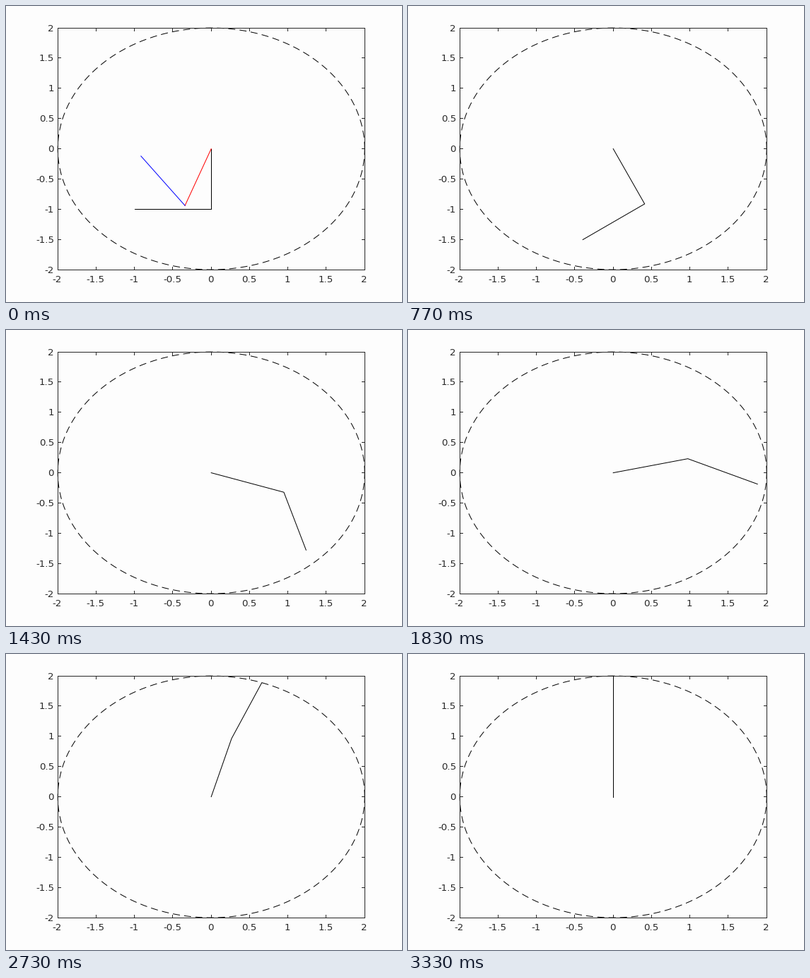
Write a matplotlib script that moves like this. It is 560 px wide and 420 px high and loops after 3.36 s.

```python
import numpy as np
import matplotlib.pyplot as plt
from matplotlib.animation import FuncAnimation
from matplotlib.collections import LineCollection

W, H, DPI = 560, 420, 100
PX = 72 / DPI                      # one pixel in points
LOOP, TICK, STEPS = 3360, 10, 100  # ms, ms, poses after the first
LEFT, RIGHT, TOP, BOTTOM = 73.2, 507.2, 31.1, 374.1
BACK, INK = "#fdfdfd", "#262626"
TICK_LEN = 4


def to_px(x, y):
    """Plot units (-2..2) to stage pixels."""
    px = LEFT + (np.asarray(x) + 2) / 4 * (RIGHT - LEFT)
    py = BOTTOM - (np.asarray(y) + 2) / 4 * (BOTTOM - TOP)
    return px, py


def crisp(v):
    return np.floor(v) + 0.5


fig = plt.figure(figsize=(W / DPI, H / DPI), dpi=DPI, facecolor=BACK)
ax = fig.add_axes([0, 0, 1, 1])
ax.set(xlim=(0, W), ylim=(H, 0))
ax.axis("off")


def draw_axes():
    x0, x1, y0, y1 = (crisp(v) for v in (LEFT, RIGHT, TOP, BOTTOM))
    segs = [[(x0, y0), (x1, y0)], [(x0, y1), (x1, y1)],
            [(x0, y0), (x0, y1)], [(x1, y0), (x1, y1)]]
    font = dict(family="DejaVu Sans", size=13.33 * PX, color=INK, va="baseline")
    for v in np.arange(-4, 5) / 2:
        px, py = to_px(v, v)
        x, y = crisp(px), crisp(py)
        segs += [[(x, y1), (x, y1 - TICK_LEN)], [(x, y0), (x, y0 + TICK_LEN)],
                 [(x0, y), (x0 + TICK_LEN, y)], [(x1, y), (x1 - TICK_LEN, y)]]
        ax.text(px - 1, 392, f"{v:g}", ha="center", **font)
        ax.text(68, y + 4.5, f"{v:g}", ha="right", **font)
    # the ends already sit on pixel centres, so no further snapping
    ax.add_collection(LineCollection(segs, colors=INK, linewidths=PX,
                                     capstyle="projecting", snap=False))


def draw_reach():
    a = np.linspace(0, 2 * np.pi, 400)
    ax.plot(*to_px(2 * np.cos(a), 2 * np.sin(a)), color="black", lw=PX,
            ls=(0, (10, 6)), dash_capstyle="butt")


def arm_points(first, second):
    """Joints of the unit-link arm for absolute link angles in degrees."""
    a = np.radians([first, second])
    x = np.concatenate([[0], np.cumsum(np.cos(a))])
    y = np.concatenate([[0], np.cumsum(np.sin(a))])
    return to_px(x, y)


draw_reach()
draw_axes()
arm, = ax.plot([], [], color="black", lw=PX)

gx, gy = arm_points(-110, 125)
ghost = [ax.plot(gx[i:i + 2], gy[i:i + 2], color=c, lw=PX)[0]
         for i, c in enumerate(("red", "blue"))]


def update(i):
    step = (3 * i + 1) // 10       # a new pose every 1/30 s
    s = step / STEPS
    ease = 3 * s**2 - 2 * s**3
    shoulder = -90 + 180 * ease
    elbow = -90 + 90 * ease
    arm.set_data(*arm_points(shoulder, shoulder + elbow))
    for link in ghost:
        link.set_visible(step == 0)
    return [arm, *ghost]


anim = FuncAnimation(fig, update, frames=LOOP // TICK, interval=TICK,
                     repeat=True, repeat_delay=0, blit=False)
plt.show()
```
